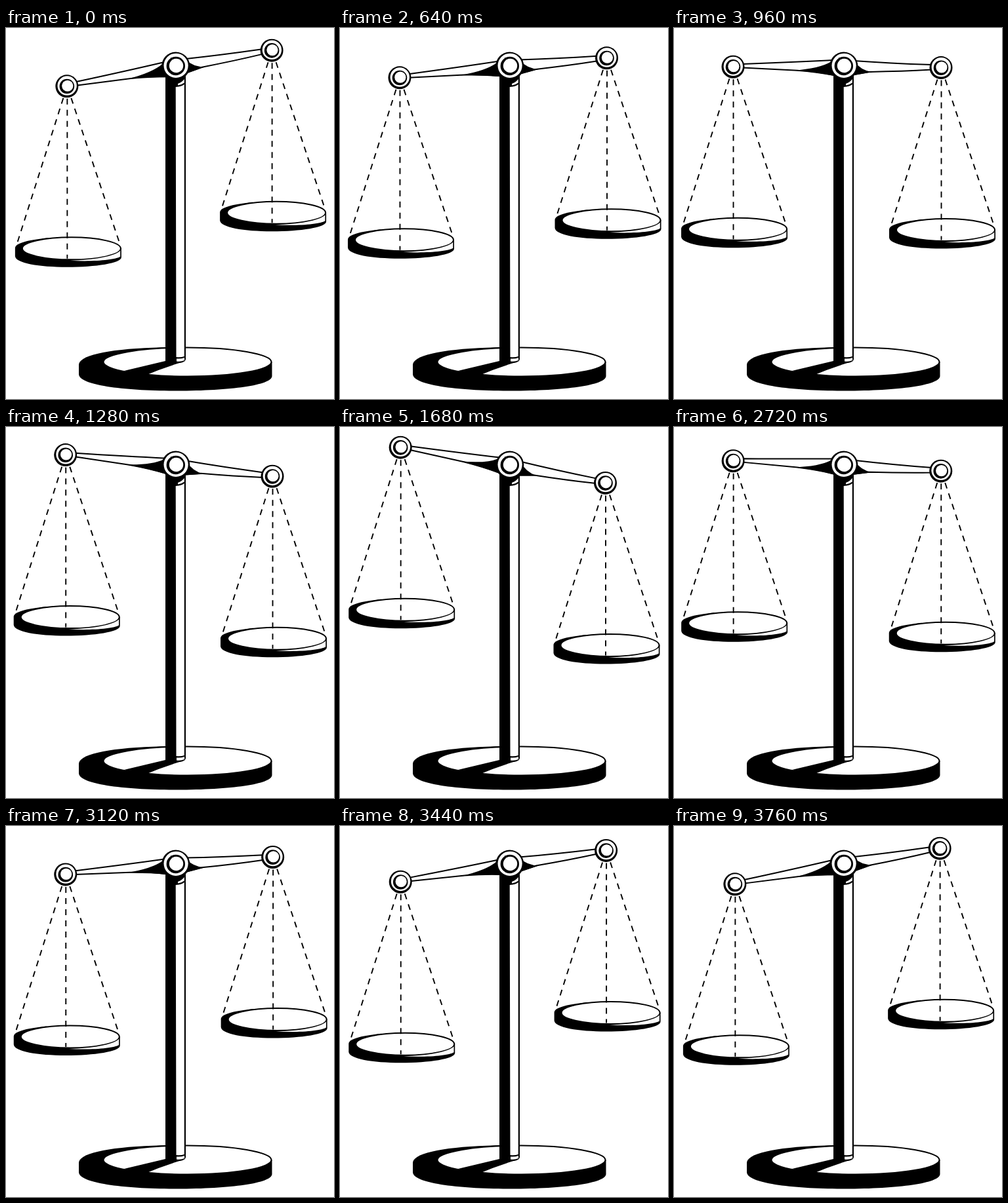
An HTML page for the animation above (3840 ms loop, 500x566 px).

```html
<!DOCTYPE html>
<html lang="en">
<head>
<meta charset="utf-8">
<title>Balance scale</title>
<style>
  html, body { margin: 0; width: 100%; height: 100%; overflow: hidden; background: #fff; }
  svg { display: block; width: 500px; height: 566px; }
  .ink { fill: #000; }
  .paper { fill: #fff; }
  .outlined { fill: #fff; stroke: #000; stroke-width: 2; stroke-linejoin: round; }
  .rope { fill: none; stroke: #000; stroke-width: 1.9; stroke-dasharray: 9 8; }
</style>
</head>
<body>
<svg viewBox="0 0 500 566" xmlns="http://www.w3.org/2000/svg">
  <defs>
    <g id="pan">
      <path class="ink" d="M-30 231.500C-62 235-79 240-79 247V259C-79 270-42 276 0 276C44 276 83 270 83 261V247Z"/>
      <ellipse class="outlined" cx="7" cy="247.500" rx="75" ry="17"/>
      <path class="paper" d="M5 266C40 265 72 260 81.300 251V260C74 265 40 268 5 266Z"/>
      <path class="rope" d="M-5.500 18L-76 240"/>
      <path class="rope" d="M.5 19V263"/>
      <path class="rope" d="M6.500 18L80.500 240"/>
    </g>
    <g id="joint">
      <circle class="ink" r="17.500"/>
      <circle class="paper" cx=".3" cy="-.8" r="14.700"/>
      <circle class="ink" cy=".2" r="11.300"/>
      <circle class="paper" cx=".9" cy="-.6" r="8.600"/>
    </g>
  </defs>

  <g id="stand">
    <path class="ink" d="M250 487C170 488 111 497 111 514V528C111 545 180 553.500 260 553.500C342 553.500 405.500 545 405.500 531V509Z"/>
    <ellipse class="outlined" cx="276.500" cy="509.500" rx="128" ry="22"/>
    <path class="ink" d="M180 523L243 508L268 510Q240 518 210 531Z"/>
    <path class="ink" d="M243 70H274V505Q273 511 262 511L243 509Z"/>
    <path class="paper" d="M258.700 90Q268 89.500 271.800 86V501Q266 503 259.500 502Z"/>
    <path class="paper" d="M262 87.500Q268 86.500 271.800 83.500V78Q268 83 262 85Z"/>
    <path class="paper" d="M260 504.500Q267 505 272 503V507Q267 509.500 260 508.500Z"/>
  </g>

  <g id="beam">
    <path class="outlined" d="M-154-3.500Q-75-6-14-9V14Q-40 9-70 6.500L-154 2Z"/>
    <path class="ink" d="M-76 6.500Q-36 4-18-7L-14 15Q-40 9-76 6.500Z"/>
    <path class="outlined" d="M16-8Q70-4 135-1.500V6Q90 8.500 40 9L16 13Z"/>
    <path class="ink" d="M18-6Q26 6 44 9.500L17 14Z"/>
  </g>

  <g id="hub" transform="translate(258.800 58)">
    <circle class="ink" r="21.500"/>
    <circle class="paper" cx=".3" cy="-.7" r="18.600"/>
    <circle class="ink" r="14.200"/>
    <circle class="paper" cx=".7" cy="-.5" r="10.700"/>
  </g>

  <g id="left"><use href="#pan"/><use href="#joint"/></g>
  <g id="right"><use href="#pan"/><use href="#joint"/></g>
</svg>
<script>
  const LOOP = 3840, STEP = 80;
  const PEAK = 1920, REST = 3780;
  const LOW = -10.35, HIGH = 10;
  const PIVOT = { x: 258, y: 58 };
  const ENDS = { left: [-168, .7], right: [149, 3] };
  const $ = id => document.getElementById(id);

  // Cubic ease-in-out with handles at .45 and .55
  function ease(p) {
    let lo = 0, hi = 1;
    for (let i = 0; i < 24; i++) {
      const s = (lo + hi) / 2, r = 1 - s;
      const x = 1.35 * r * r * s + 1.65 * r * s * s + s * s * s;
      if (x < p) lo = s; else hi = s;
    }
    return lo * lo * (3 - 2 * lo);
  }

  function tilt(t) {
    const lift = t < PEAK
      ? ease(t / PEAK)
      : 1 - ease(Math.min(1, (t - PEAK) / (REST - PEAK)));
    return LOW + (HIGH - LOW) * lift;
  }

  function draw(t) {
    const deg = tilt(t), a = deg * Math.PI / 180;
    const c = Math.cos(a), s = Math.sin(a);
    $('beam').setAttribute('transform', `translate(${PIVOT.x} ${PIVOT.y}) rotate(${deg})`);
    for (const [id, [x, y]] of Object.entries(ENDS)) {
      const px = PIVOT.x + x * c - y * s;
      const py = PIVOT.y + x * s + y * c;
      $(id).setAttribute('transform', `translate(${px} ${py})`);
    }
  }

  const start = performance.now();
  function tick() {
    const t = (performance.now() - start) % LOOP;
    draw(Math.floor(t / STEP) * STEP);
    requestAnimationFrame(tick);
  }
  tick();
</script>
</body>
</html>
```
